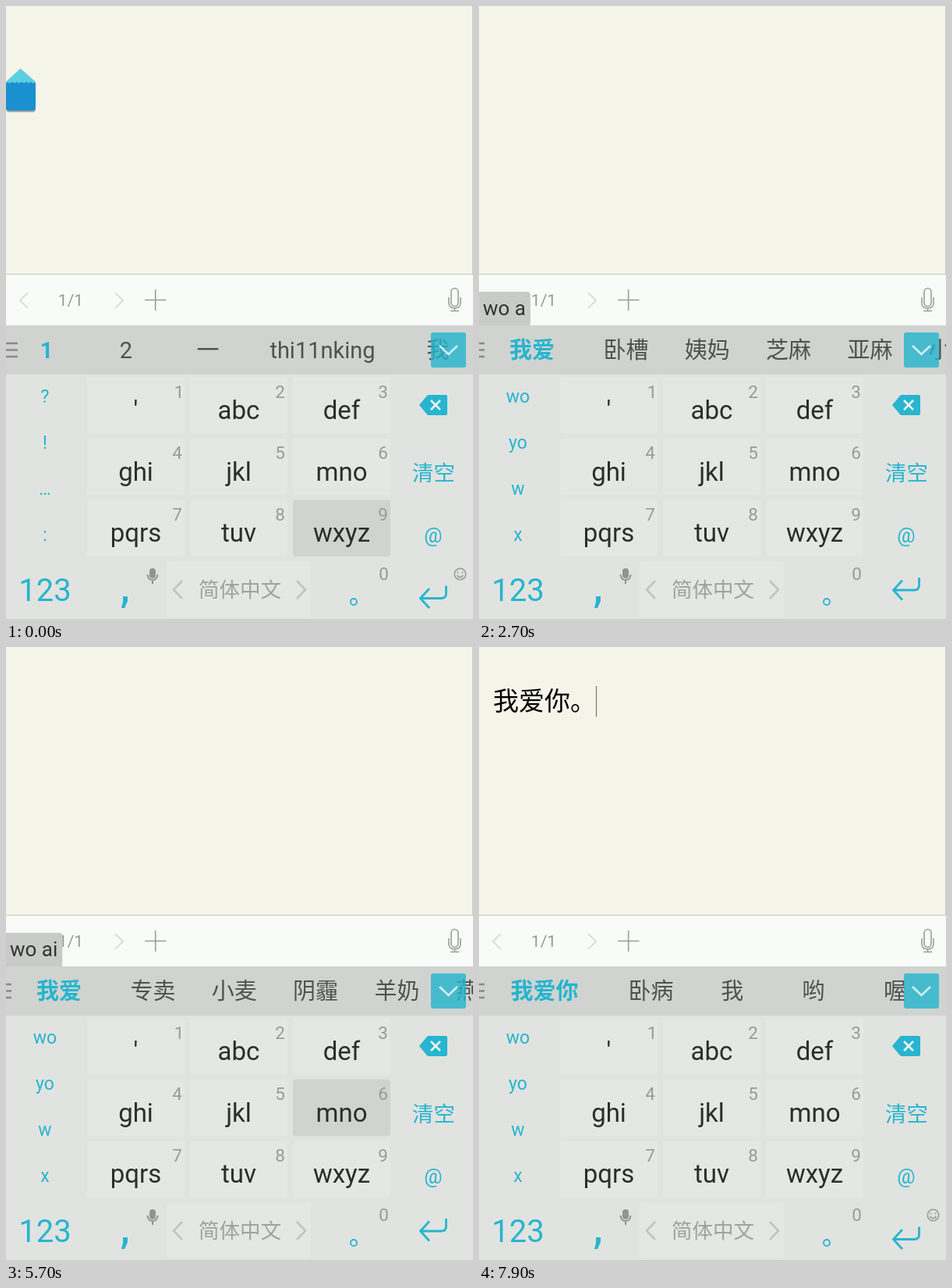
Animation of 599x785 px, one loop 8000 ms. Source, as an HTML page:

```html
<!DOCTYPE html>
<html lang="zh-CN">
<head>
<meta charset="utf-8">
<title>Pinyin keyboard</title>
<style>
html, body { margin: 0; width: 100%; height: 100%; overflow: hidden; background: #f5f4e8; }
svg { display: block; width: 100%; height: 100%; }
text { font-family: Roboto, "Noto Sans CJK SC", "Noto Sans CJK", sans-serif; text-anchor: middle; white-space: pre; }
.start { text-anchor: start; }
.teal { fill: #27b5cf; }
.line { fill: none; stroke: #9b9d9b; stroke-width: 1.6; }
</style>
</head>
<body>
<svg id="stage" viewBox="0 0 599 785">
  <path d="M0 0H599V785H0Z" fill="#f5f4e8"/>
  <path d="M598.5 0V343" stroke="#cbcbc3"/>
  <text id="note" class="start" x="18" y="80.5" font-size="33"></text>
  <path id="caret" stroke="#77776f" stroke-width="1.2"/>
  <g id="handle">
    <rect y="100" width="38" height="36" rx="4" fill="#77776f" opacity=".6"/>
    <rect y="96" width="38" height="38" rx="4" fill="#1b90d0"/>
    <path d="M18.5 80L38 97L35 99L32 97L29 99L26 97L23 99L20 97L17 99L14 97L11 99L8 97L5 99L0 97Z" fill="#5ccfe0"/>
  </g>

  <path d="M0 343H599V409H0Z" fill="#f9fbf8"/>
  <path d="M0 343.5H599" stroke="#c6c7c0"/>
  <path class="line" d="M28 367L18 377L28 387M140 367L150 377L140 387" style="stroke:#d4d6d3"/>
  <text x="83" y="384" font-size="21" fill="#989a98">1/1</text>
  <path class="line" d="M178 376.500H205.500M191.700 363V390"/>
  <g class="line">
    <rect x="571" y="361.500" width="9" height="23" rx="4.500"/>
    <path d="M568 373V380Q568 387 575.500 387T583 380V373M575.500 387V390.500M570 390.500H581"/>
  </g>
  <rect id="popBox" x="-6" y="366" height="44" rx="4" fill="#c9cbc8"/>
  <text id="pop" class="start" x="5" y="396" font-size="26" fill="#333"></text>

  <path d="M0 409H599V472H0Z" fill="#d1d3d0"/>
  <path id="menu" stroke="#898b89" stroke-width="2.6"/>
  <g id="words" font-size="29" fill="#505250"></g>
  <rect x="545" y="418" width="45" height="45" rx="3" fill="#23b6cf" opacity=".8"/>
  <path d="M556 435L567.500 446L579 435" fill="none" stroke="#d3ecf0" stroke-width="2.600"/>

  <path d="M0 472H599V785H0Z" fill="#e1e3e0"/>
  <g id="keys"></g>
  <g id="side" class="teal" font-size="23"></g>
  <path class="teal" d="M530 511L540 499Q541 498 542 498H564Q566 498 566 500V522Q566 524 564 524H542Q541 524 540 523Z"/>
  <path d="M545 505L557 517M557 505L545 517" stroke="#eef3f1" stroke-width="2.600"/>
  <text class="teal" x="548.500" y="608" font-size="27.500">清空</text>
  <text class="teal" x="548" y="687" font-size="26">@</text>
  <text class="teal" x="50" y="762" font-size="40">123</text>
  <path class="teal" d="M150 756H156V762L152 771H148L150 763Z"/>
  <g fill="#929492">
    <rect x="184" y="720" width="8" height="13" rx="4"/>
    <path d="M181.500 728Q182 735 188 735T194.500 728M188 735V740" fill="none" stroke="#929492" stroke-width="2"/>
  </g>
  <rect x="206" y="711" width="185" height="72" rx="4" fill="#e5e7e4"/>
  <path d="M226 736L215 747.500L226 759M373 736L384 747.500L373 759" fill="none" stroke="#c2c4c2" stroke-width="2.600"/>
  <text x="300" y="757" font-size="26.500" fill="#a0a2a0">简体中文</text>
  <circle cx="446" cy="763" r="4" fill="none" stroke="#27b5cf" stroke-width="1.800"/>
  <text x="484.500" y="735" font-size="22.500" fill="#999b99">0</text>
  <path id="enter" d="M564.500 732V742Q564.500 748 558 748H532M543 735.500L531.500 748L543 760.500" fill="none" stroke="#27b5cf" stroke-width="2.800"/>
  <g id="smile" class="line">
    <circle cx="582.500" cy="727.500" r="7.200"/>
    <path d="M578.500 729Q582.500 734.500 586.500 729M579.500 724.500V726.500M585.500 724.500V726.500"/>
  </g>
</svg>
<script>
const $ = id => document.getElementById(id);
const show = (id, on) => $(id).style.display = on ? '' : 'none';
const put = (id, html) => { if ($(id).last !== html) $(id).innerHTML = $(id).last = html; };

const labels = ["'", 'abc', 'def', 'ghi', 'jkl', 'mno', 'pqrs', 'tuv', 'wxyz'];
$('keys').innerHTML = labels.map((label, i) => {
  const x = 104 + i % 3 * 132, y = 475 + Math.floor(i / 3) * 78.7;
  return `<rect id="key${i}" x="${x}" y="${y}" width="125" height="72.500" rx="4"/>
    <text x="${x + 62.5}" y="${y + 54}" font-size="33" fill="#2c2e2c">${label}</text>
    <text x="${x + (i ? 115.5 : 118)}" y="${y + 26.5}" font-size="22.500" fill="#999b99">${i + 1}</text>`;
}).join('');

// [first centre, second centre, words]; later words follow at a fixed pitch
const W = {
  w: [53, 159, '我 一 在 有 也 要'],
  wo: [53, 159, '我 哟 喔 握 卧 窝'],
  woa: [68, 188.5, '我爱 卧槽 姨妈 芝麻 亚麻 小麻'],
  woai: [68, 188.5, '我爱 专卖 小麦 阴霾 羊奶 燕麦'],
  woain: [84, 221, '我爱你 我 哟 喔 一'],
  woaini: [84, 220.5, '我爱你 卧病 我 哟 喔']
};
const PITCH = 104.3;

// Timelines: [start ms, value]
const keyTrack = [[0, 8], [200, -1], [1100, 5], [1300, -1], [2400, 1], [2600, -1],
  [4600, 3], [4800, -1], [5700, 5], [5900, -1], [6600, 3], [6800, -1]];
const popTrack = [[0, ''], [300, 'w'], [1400, 'wo'], [2700, 'wo a'], [4900, 'wo ai'],
  [6000, 'wo ai n'], [6900, 'wo ai ni'], [7700, '']];
const wordTrack = [[0, ''], [400, 'w'], [1400, 'wo'], [2700, 'woa'], [4900, 'woai'],
  [6000, 'woain'], [7000, 'woaini']];
const noteTrack = [[0, ''], [7700, '我爱你'], [7800, '我爱你。']];
const sideTrack = [[0, '?!…:'], [300, 'w x y z'], [1400, 'wo yo w x']];
const caretTrack = [200, 700, 1200, 1700, 2200, 2700, 3300, 3800, 4200, 4800, 5300, 5700, 6200, 6800, 7300];

const at = (track, t) => track.filter(s => s[0] <= t).pop()[1];
const word = (s, x, bold) =>
  `<text x="${x}" y="451"${bold ? ' class="teal" font-weight="700"' : ''}>${s}</text>`;

function wordRow(name) {
  if (!name) {
    return word('1', 52, true) + word('2', 154) + word('一', 259) + word('thi11nking', 406) + word('我', 554);
  }
  const [first, second, list] = W[name];
  return list.split(' ').map((s, i) => word(s, i ? second + (i - 1) * PITCH : first, !i)).join('');
}

function draw(t) {
  const pressed = at(keyTrack, t), pop = at(popTrack, t), note = at(noteTrack, t), side = at(sideTrack, t);
  labels.forEach((_, i) => $('key' + i).setAttribute('fill', i === pressed ? '#d1d3d0' : '#e5e7e4'));
  put('words', wordRow(at(wordTrack, t)));
  put('side', side.split(side.includes(' ') ? ' ' : '')
    .map((s, i) => `<text x="50" y="${508 + i * 59}">${s}</text>`).join(''));

  put('pop', pop);
  show('popBox', pop);
  if (pop) $('popBox').setAttribute('width', $('pop').getComputedTextLength() + 17);

  put('note', note);
  const x = 18.5 + note.length * 33, y = note ? 50 : 36;
  $('caret').setAttribute('d', `M${x} ${y}v39.500`);
  show('caret', note || caretTrack.filter(c => c <= t).length % 2);
  show('handle', t < 2300);

  const slide = Math.min(1, Math.max(0, (t - 300) / 300));
  const end = 15 - 8 * slide;
  $('menu').setAttribute('d', [432, 440.5, 449].map(y => `M0 ${y}H${end}`).join(''));

  const idle = t < 400 || t >= 7900;
  show('smile', idle);
  $('enter').setAttribute('transform', `translate(0 ${idle ? 10.5 : 0})`);
}

function tick() {
  draw(performance.now() % 8000);
  requestAnimationFrame(tick);
}
tick();
</script>
</body>
</html>
```
